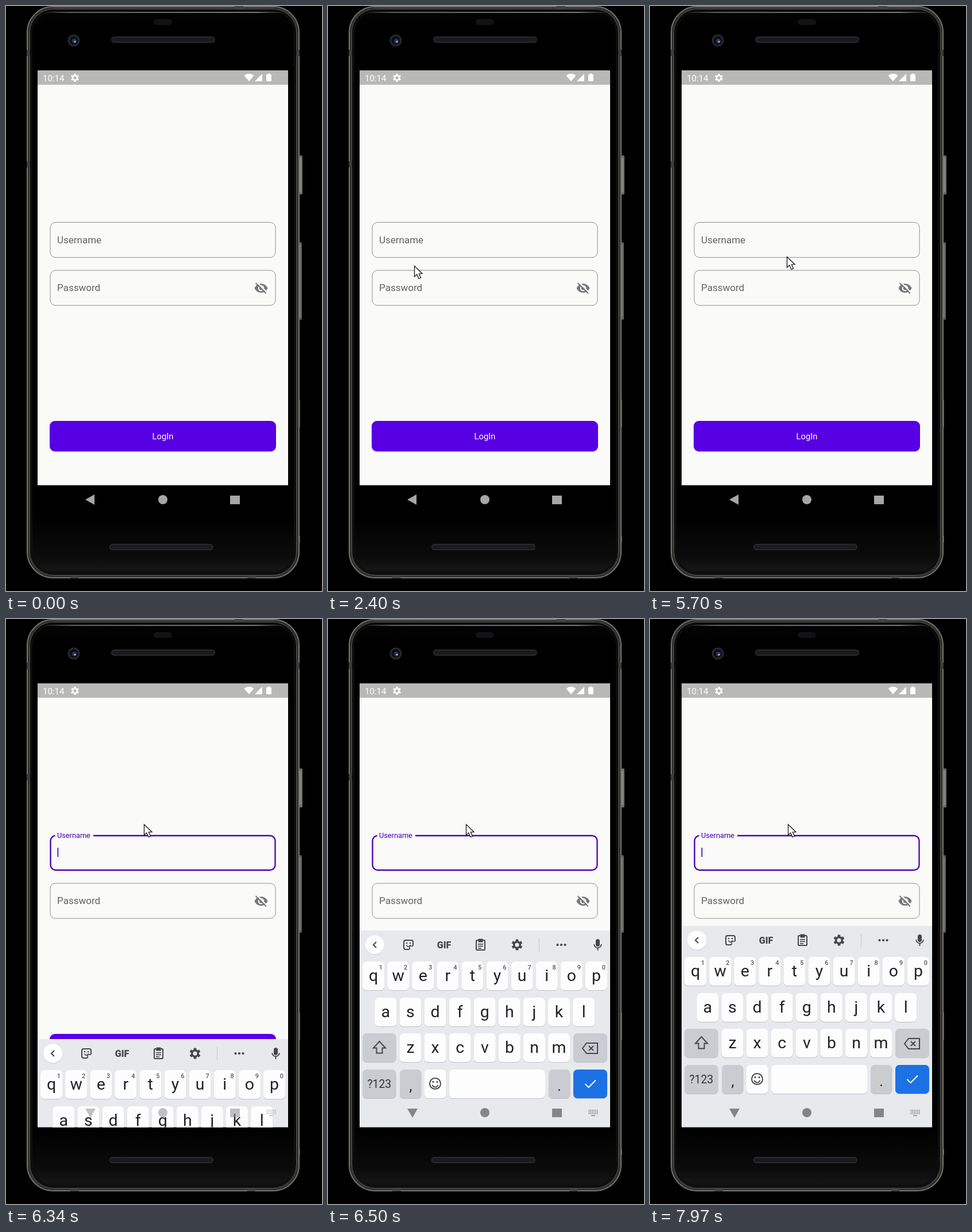
Recreate the animation shown at these times as an HTML page with a canvas. Size 550 px wide and 1018 px high, loop 8000 ms.

```html
<!DOCTYPE html>
<html lang="en">
<head>
<meta charset="utf-8">
<title>Login screen</title>
<style>
html, body { margin: 0; width: 100%; height: 100%; overflow: hidden; background: #000; }
canvas { display: block; width: 550px; height: 1018px; }
</style>
</head>
<body>
<canvas id="stage" width="550" height="1018"></canvas>
<script>
const ctx = document.getElementById('stage').getContext('2d');
const LOOP = 8000;
const FOCUS = 5970;
const PAPER = '#fafaf8';
const PURPLE = '#5800e4';
const ACCENT = '#4a00b8';
const OUTLINE = '#8e8e90';
const INK = '#44464b';
const KEYBOARD = '#e8e9ed';

const clamp = v => Math.max(0, Math.min(1, v));
const mix = (a, b, p) => a + (b - a) * p;
const progress = (t, start, length) => clamp((t - start) / length);
const easeOut = p => 1 - (1 - p) ** 2;
const easeInOut = p => p * p * (3 - 2 * p);

function rect(x, y, w, h, color) {
  ctx.fillStyle = color;
  ctx.fillRect(x, y, w, h);
}

function roundPath(x, y, w, h, r) {
  ctx.beginPath();
  ctx.roundRect(x, y, w, h, r);
}

function roundFill(x, y, w, h, r, color) {
  roundPath(x, y, w, h, r);
  ctx.fillStyle = color;
  ctx.fill();
}

function roundLine(x, y, w, h, r, color, width = 1) {
  roundPath(x, y, w, h, r);
  ctx.strokeStyle = color;
  ctx.lineWidth = width;
  ctx.stroke();
}

function disc(x, y, r, color) {
  ctx.beginPath();
  ctx.arc(x, y, r, 0, 7);
  ctx.fillStyle = color;
  ctx.fill();
}

function trace(points, closed) {
  ctx.beginPath();
  points.forEach(([x, y]) => ctx.lineTo(x, y));
  if (closed) ctx.closePath();
}

function polygon(points, color) {
  trace(points, true);
  ctx.fillStyle = color;
  ctx.fill();
}

function polyline(points, color, width, closed = false) {
  trace(points, closed);
  ctx.strokeStyle = color;
  ctx.lineWidth = width;
  ctx.stroke();
}

function text(str, x, y, size, color, align = 'left', weight = 400) {
  ctx.font = `${weight} ${size}px Roboto, sans-serif`;
  ctx.textAlign = align;
  ctx.fillStyle = color;
  ctx.fillText(str, x, y);
}

function at(x, y, draw) {
  ctx.save();
  ctx.translate(x, y);
  draw();
  ctx.restore();
}

function gear(x, y, r, color) {
  at(x, y, () => {
    ctx.strokeStyle = color;
    ctx.lineWidth = r * 0.36;
    ctx.beginPath();
    ctx.arc(0, 0, r * 0.56, 0, 7);
    ctx.stroke();
    for (let i = 0; i < 6; i++) {
      ctx.rotate(Math.PI / 3);
      rect(-r * 0.24, -r, r * 0.48, r * 0.4, color);
    }
  });
}

function drawBody() {
  rect(0, 0, 550, 1018, '#000');
  roundFill(510, 260, 6, 68, 2, '#6a6a68');
  rect(511, 264, 3, 60, '#858585');
  roundFill(510, 411, 5, 135, 2, '#5c5c5a');
  rect(511, 415, 2, 127, '#777775');
  rect(510, 685, 2, 48, '#4a4a48');
  rect(510, 922, 2, 11, '#4a4a48');

  const shell = ctx.createLinearGradient(0, 0, 0, 996);
  shell.addColorStop(0, '#050505');
  shell.addColorStop(0.04, '#000');
  shell.addColorStop(0.89, '#000');
  shell.addColorStop(0.96, '#0b0b0b');
  shell.addColorStop(0.985, '#151515');
  shell.addColorStop(1, '#050505');
  roundFill(36, 0, 475, 996, 46, shell);
  roundLine(37, 1, 473, 994, 45, '#74746c', 2);
  roundLine(39.5, 3.5, 468, 989, 43, '#32322e', 3);
  roundLine(41.5, 5.5, 464, 985, 41, '#5a5a56', 1);
  roundLine(44.5, 9.5, 458, 977, 38, '#0e0e10', 3);

  const glint = ctx.createLinearGradient(65, 0, 485, 0);
  glint.addColorStop(0, 'rgba(150,150,150,0)');
  glint.addColorStop(0.12, '#777');
  glint.addColorStop(0.88, '#999');
  glint.addColorStop(1, 'rgba(150,150,150,0)');
  rect(65, 10.5, 420, 1.5, glint);

  for (const y of [76, 270]) rect(36, y, 6, 11, '#3b3b39');
  rect(505, 76, 6, 11, '#3b3b39');
  rect(398, 0, 15, 4, '#44443f');
  rect(112, 992, 15, 4, '#44443f');
  rect(420, 992, 14, 4, '#44443f');

  speaker(183, 53);
  speaker(180, 936);
  roundFill(257, 23, 32, 10, 5, '#131316');
  disc(118, 60, 10.5, '#29292d');
  disc(118, 60, 7.5, '#0d0d15');
  disc(119, 61, 4, '#29345f');
  disc(120, 62, 1.6, '#aebcf0');
}

function speaker(x, y) {
  roundFill(x, y, 181, 11, 5.5, '#29292c');
  roundFill(x + 2, y + 2, 177, 7, 3.5, '#1a1a1e');
}

function drawStatusBar() {
  rect(55, 112, 436, 25, '#b8b8b6');
  text('10:14', 64, 130.5, 15, '#fff');
  gear(120, 125, 7, '#fff');
  ctx.beginPath();
  ctx.moveTo(423, 131);
  ctx.lineTo(414.5, 121);
  ctx.quadraticCurveTo(423, 114.5, 431.5, 121);
  ctx.fillStyle = '#fff';
  ctx.fill();
  polygon([[433, 131], [446, 131], [446, 118]], '#fff');
  roundFill(453, 119, 9, 12, 1, '#fff');
  rect(455.5, 117.5, 4, 2, '#fff');
}

function drawEye() {
  at(444, 491, () => {
    ctx.beginPath();
    ctx.moveTo(-11.5, 0);
    ctx.bezierCurveTo(-7, -10.5, 7, -10.5, 11.5, 0);
    ctx.bezierCurveTo(7, 10.5, -7, 10.5, -11.5, 0);
    ctx.fillStyle = '#77777b';
    ctx.fill();
    disc(0, 0, 5.3, PAPER);
    disc(0, 0, 3.2, '#77777b');
    polyline([[-7.5, -10.5], [11, 8]], PAPER, 2.2);
    polyline([[-9.5, -9], [8.8, 9.3]], '#77777b', 2);
  });
}

function drawForm(t) {
  const p = easeInOut(progress(t, FOCUS, 167));
  const focused = t >= FOCUS;
  rect(55, 137, 436, 697, PAPER);

  const inset = focused ? 1 : 0.5;
  roundLine(76.5 + inset, 376 + inset, 393 - 2 * inset, 62 - 2 * inset, 9,
    focused ? ACCENT : OUTLINE, focused ? 2.3 : 1);
  if (focused) rect(85.5, 374, 66.5 * p, 6, PAPER);
  text('Username', 89, mix(412.5, 381.3, p), mix(17, 12.75, p), focused ? ACCENT : '#626264');
  if (focused && (t - FOCUS) % 1000 < 500) rect(89.5, 398, 1.7, 16, ACCENT);

  roundLine(77, 460, 392, 61, 9, OUTLINE);
  text('Password', 89, 496, 17, '#626264');
  drawEye();

  roundFill(76, 724, 394, 53, 10, '#d6d6d8');
  roundFill(76, 722, 394, 53, 9, PURPLE);
  text('LogIn', 273, 754, 14.8, '#fff', 'center');
}

function key(x, y, w, color = '#fdfdfd') {
  roundFill(x, y + 1, w, 50, 7, '#bfc0c6');
  roundFill(x, y, w, 50, 7, color);
}

function letters(row, firstCenter, y) {
  [...row].forEach((letter, i) => {
    const x = firstCenter + i * 43.1;
    key(x - 19, y, 38);
    text(letter, x, y + 34, 28.5, '#202124', 'center');
  });
}

function drawToolbar() {
  disc(81.5, 26, 16.5, '#c9cad0');
  disc(81.5, 25, 16.5, '#fff');
  polyline([[84, 20], [79, 25], [84, 30]], INK, 2);

  roundLine(132, 17, 16, 16, 3, INK, 2);
  polygon([[141, 34], [149, 26], [149, 34]], KEYBOARD);
  polyline([[142, 33], [142, 27], [148, 27]], INK, 1.6);
  disc(137, 22, 1.3, INK);
  disc(143, 22, 1.3, INK);
  ctx.beginPath();
  ctx.arc(140, 24.5, 3.5, 0.2, 2.9);
  ctx.stroke();

  text('GIF', 202, 30.5, 16, INK, 'center', 900);

  roundLine(258, 17, 15, 17, 1.5, INK, 2);
  rect(261.5, 14.5, 8, 6, INK);
  [23, 26.5, 30].forEach((y, i) => rect(261, y, i === 2 ? 6 : 9, 1.6, INK));

  gear(329, 25, 9.5, INK);
  rect(367, 13, 1, 24, '#c8c9ce');
  for (const dx of [-6.5, 0, 6.5]) disc(406 + dx, 25, 2.1, INK);

  roundFill(466, 15, 7, 13, 3.5, INK);
  ctx.beginPath();
  ctx.arc(469.5, 24, 6.3, 0, Math.PI);
  ctx.strokeStyle = INK;
  ctx.lineWidth = 1.8;
  ctx.stroke();
  rect(468.6, 30, 1.8, 5, INK);
}

function drawFunctionKeys() {
  const gray = '#cbccd2';
  key(60, 179, 58.5, gray);
  polyline([[89.5, 193], [100, 204.5], [94.5, 204.5], [94.5, 213.5],
    [84.5, 213.5], [84.5, 204.5], [79, 204.5]], INK, 2, true);
  key(427, 179, 59, gray);
  polyline([[443, 205], [450, 196], [469, 196], [469, 214], [450, 214]], INK, 2, true);
  polyline([[454, 201], [462, 209]], INK, 2);
  polyline([[462, 201], [454, 209]], INK, 2);

  key(60, 242, 58.5, gray);
  text('?123', 89.3, 273.5, 19.3, '#303237', 'center');
  key(125, 242, 37.5, gray);
  text(',', 144, 278.5, 25, '#202124', 'center');
  key(168, 242, 37.5);
  key(211, 242, 167);
  key(384, 242, 37.5, gray);
  text('.', 402.5, 278.5, 25, '#202124', 'center');
  key(427, 242, 59, '#1c72e4');
  polyline([[447.5, 267], [453.5, 273], [466, 260.5]], '#fff', 2);

  ctx.strokeStyle = INK;
  ctx.lineWidth = 2;
  ctx.beginPath();
  ctx.arc(186.5, 266.5, 9.5, 0, 7);
  ctx.stroke();
  disc(183, 263.5, 1.6, INK);
  disc(190, 263.5, 1.6, INK);
  ctx.beginPath();
  ctx.arc(186.5, 267.5, 5, 0.25, 2.9);
  ctx.stroke();
}

function drawKeyboard(offset) {
  ctx.save();
  ctx.beginPath();
  ctx.rect(55, 112, 436, 772.5);
  ctx.clip();
  ctx.translate(0, 534 + Math.round(offset));
  rect(55, 0, 436, 352, KEYBOARD);
  drawToolbar();
  letters('qwertyuiop', 79, 54);
  [...'1234567890'].forEach((digit, i) =>
    text(digit, 92 + i * 43.1, 67.5, 11, '#55575c', 'center', 500));
  letters('asdfghjkl', 100.3, 117);
  letters('zxcvbnm', 143.5, 179);
  drawFunctionKeys();
  ctx.restore();
}

function drawNavigation(p) {
  const shade = Math.round(mix(255, 0, p));
  const color = `rgba(${shade},${shade},${shade},${mix(0.65, 0.43, p)})`;
  at(147, 859, () => {
    ctx.rotate(-Math.PI / 2 * clamp(p * 2.4));
    polygon([[-9, 0], [7, -9], [7, 9]], color);
  });
  disc(273, 859, 8, color);
  rect(390, 852, 17, 15, color);
  if (p > 0) {
    for (let row = 0; row < 3; row++)
      for (let col = 0; col < 6; col++)
        rect(453.5 + col * 2.9, 854 + row * 2.9, 1.7, 1.7, color);
    rect(458, 863.5, 7, 1.5, color);
  }
}

// Each move: start, end, and the pointer tip it arrives at.
const moves = [
  [2130, 2400, 150, 452],
  [2730, 2930, 188, 434],
  [3100, 3400, 208, 426],
  [3730, 3930, 225, 417],
  [4130, 4500, 246, 424],
  [4500, 4900, 235, 430],
  [5240, 5440, 238, 436],
  [5700, 5880, 241, 402],
  [5980, 6140, 240, 357]
];

function drawPointer(t) {
  if (t < moves[0][0]) return;
  let x = 1, y = 490;
  for (const [start, end, toX, toY] of moves) {
    const p = easeInOut(progress(t, start, end - start));
    x = mix(x, toX, p);
    y = mix(y, toY, p);
  }
  at(x + 0.5, y + 0.5, () => {
    const arrow = [[0, 0], [0, 18.5], [4.2, 14.6], [7.6, 22], [11, 20.4], [7.8, 13.4], [13.5, 13.2]];
    polygon(arrow, '#fff');
    polyline(arrow, '#18181c', 1.3, true);
  });
}

function draw(t) {
  const slide = easeOut(progress(t, 6274, 267));
  drawBody();
  drawStatusBar();
  drawForm(t);
  if (slide > 0) drawKeyboard(351 * (1 - slide));
  drawNavigation(slide);
  drawPointer(t);
}

const began = performance.now();
function frame() {
  draw((performance.now() - began) % LOOP);
  requestAnimationFrame(frame);
}
frame();
</script>
</body>
</html>
```
